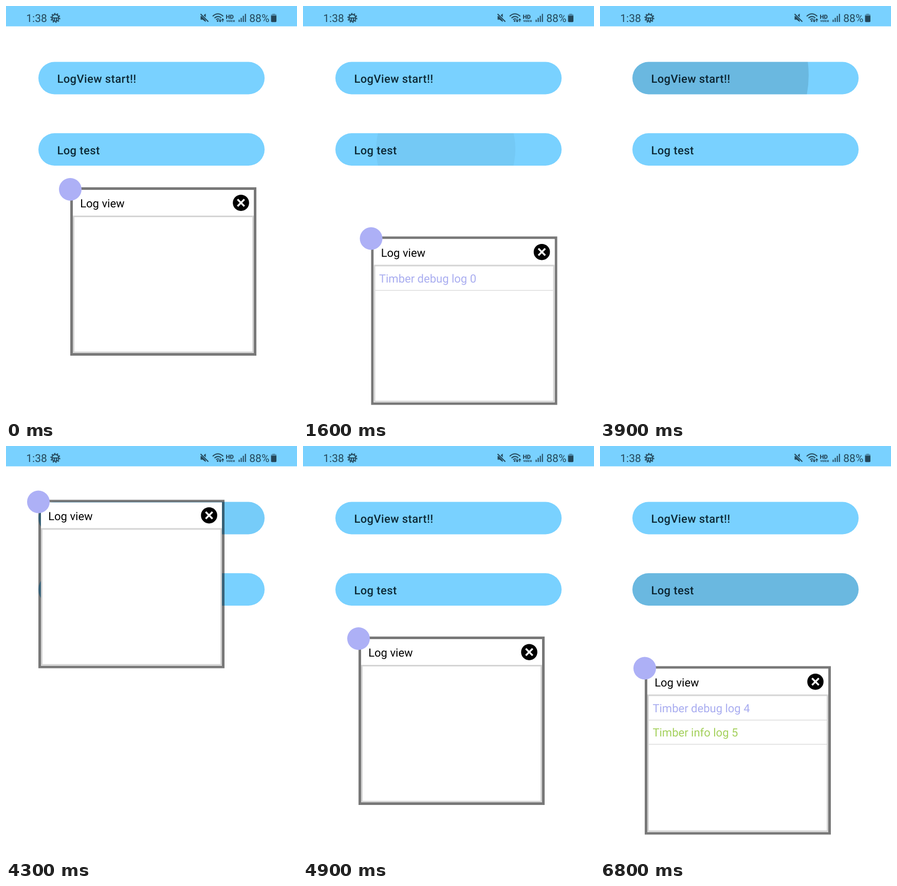
Write an HTML page that moves like this. It is 566 px wide and 800 px high and loops after 6.9 s.

```html
<!DOCTYPE html>
<html lang="en">
<head>
<meta charset="utf-8">
<title>Log view demo</title>
<style>
  html, body { margin: 0; width: 100%; height: 100%; overflow: hidden; background: #fff; }
  svg { display: block; width: 100vw; height: 100vh; }
  text { font-family: Roboto, sans-serif; font-size: 22px; text-rendering: geometricPrecision; }
  .status { fill: #24475a; }
  .status text { font-size: 21px; }
  .status .hd { font-size: 11.5px; font-weight: 800; }
  .status .voice { font-size: 7px; font-weight: 700; }
  .line { fill: none; stroke: #24475a; stroke-width: 2; }
  .label { font-weight: 500; letter-spacing: .38px; fill: #0e2a38; }
  .pill { fill: #79d1ff; }
</style>
</head>
<body>
<svg viewBox="0 0 566 800">
  <defs>
    <clipPath id="startClip"><rect x="63" y="108.5" width="440" height="63" rx="31.5"/></clipPath>
    <clipPath id="testClip"><rect x="63" y="247" width="440" height="63" rx="31.5"/></clipPath>
  </defs>

  <rect class="pill" width="566" height="39.5"/>
  <g class="status">
    <text x="39.3" y="31">1:38</text>
    <!-- settings -->
    <circle class="line" cx="96" cy="23.2" r="6.6"/>
    <circle class="line" cx="96" cy="23.2" r="8.6" stroke-dasharray="2.7 2.7"/>
    <path class="line" d="M89.5 23.2H102.5M94 23.2V29M98 23.2V29" stroke-width="1.8"/>
    <!-- muted speaker -->
    <path d="M378.5 19.5H382.5L388.5 14.8V31L382.5 26.6H378.5Z"/>
    <path d="M378.5 14.8L394 30.5" stroke="#79d1ff" stroke-width="4"/>
    <path class="line" d="M378.5 15.5L393.5 30.5"/>
    <!-- wifi -->
    <g class="line">
      <path d="M402 20Q412 10.5 422.5 20M405.5 23.5Q412 17.5 418.8 23"/>
      <path d="M408.6 26.6Q412 23.8 414.6 26"/>
      <path d="M416.5 24.5V30M414.3 28L416.5 30.5L418.7 28M421.5 31V25.5M419.3 27.6L421.5 25L423.7 27.6" stroke-width="1.5"/>
    </g>
    <circle cx="411.6" cy="29" r="1.7"/>
    <text class="hd" x="427.5" y="24.6">HD</text>
    <text class="voice" x="428.5" y="30.8">voice</text>
    <!-- signal -->
    <path d="M452.5 26.5h2v4.5h-2zM456.5 23h2v8h-2zM460.6 19h2v12h-2zM464.7 15.3h2v15.7h-2z"/>
    <text x="473.3" y="31">88%</text>
    <!-- battery -->
    <path d="M518 15H523.5V16.5H526V20H515.5V16.5H518Z" opacity=".5"/>
    <path d="M515.5 19H526V29.5Q526 31.3 524.2 31.3H517.3Q515.5 31.3 515.5 29.5Z"/>
  </g>

  <rect class="pill" x="63" y="108.5" width="440" height="63" rx="31.5"/>
  <text class="label" x="99.4" y="149">LogView start!!</text>
  <g id="start" clip-path="url(#startClip)"></g>

  <rect class="pill" x="63" y="247" width="440" height="63" rx="31.5"/>
  <text class="label" x="99.4" y="287.5">Log test</text>
  <g id="test" clip-path="url(#testClip)"></g>

  <g id="panel">
    <rect x="2.5" y="2.5" width="357" height="322" fill="none" stroke="#000" stroke-opacity=".53" stroke-width="5"/>
    <rect x="5" y="5" width="352" height="317" fill="#fff"/>
    <rect x="6.5" y="56.5" width="349" height="264" fill="none" stroke="#d4d4d4" stroke-width="3"/>
    <text x="19.2" y="39">Log view</text>
    <circle cx="332" cy="30.2" r="15.8"/>
    <path d="M325.4 23.6L338.6 36.8M338.6 23.6L325.4 36.8" stroke="#fff" stroke-width="3.5"/>
    <g id="rows"></g>
    <circle cx="0" cy="4" r="22" fill="#adb0f6"/>
  </g>
</svg>
<script>
const LOOP = 6900, STEP = 100;
const GROW = 360, FADE_IN = 120, FADE_OUT = 240, LOG_DELAY = 50;
const CLOSED = 3400;
const CENTER_X = 283, R0 = 132, R1 = 238;

const $ = id => document.getElementById(id);
const lerp = (a, b, k) => a + (b - a) * k;
const clamp = v => Math.max(0, Math.min(1, v));

function add(parent, tag, attrs, text = '') {
  const el = document.createElementNS('http://www.w3.org/2000/svg', tag);
  for (const name in attrs) el.setAttribute(name, attrs[name]);
  el.textContent = text;
  return parent.appendChild(el);
}

// cubic-bezier(.4, 0, .2, 1)
function ease(x) {
  let lo = 0, hi = 1;
  for (let i = 0; i < 20; i++) {
    const s = (lo + hi) / 2, q = 1 - s;
    if (1.2 * s * q * q + .6 * s * s * q + s ** 3 < x) lo = s; else hi = s;
  }
  return 3 * lo * lo * (1 - lo) + lo ** 3;
}

// Points are [time, x, y, opacity]
const track = [
  [0, 125, 352, 1], [100, 127, 375, 1], [200, 131, 425, 1], [300, 132.5, 447.5, 1],
  [3200, 132.5, 447.5, 1], [CLOSED, 132.5, 447.5, 0],
  [3900, 63, 104.5, 0], [4100, 63, 104.5, 1], [4500, 63, 104.5, 1],
  [4600, 66, 112, 1], [4700, 78, 136.5, 1], [4800, 115, 235, 1], [4900, 108, 370, 1],
  [5000, 87, 427.5, 1], [LOOP, 87, 427.5, 1]
];

function panelAt(t) {
  const i = track.findIndex(p => p[0] > t);
  const a = track[i - 1], b = track[i], k = (t - a[0]) / (b[0] - a[0]);
  return a.map((v, n) => lerp(v, b[n], k));
}

const levels = [['debug', '#a9adf0'], ['info', '#a4d05c'], ['error', '#ee5c55'], ['warn', '#d9863f']];
const testTaps = [880, 1560, 2149, 2440, 6060, 6450];

const ripples = testTaps.map(time => ({ time, x: 277, y: 278, midY: 278.5, box: $('test') }));
ripples.push({ time: 3745, x: 142, y: 130, midY: 140, box: $('start') });
ripples.forEach(r => r.el = add(r.box, 'circle', {}));

const rows = testTaps.map((time, n) => {
  const [name, fill] = levels[n % 4];
  const el = add($('rows'), 'g', { transform: `translate(0 ${n % 4 * 47})` });
  add(el, 'text', { x: 15.4, y: 89.5, fill }, `Timber ${name} log ${n}`);
  add(el, 'rect', { x: 8, y: 104, width: 346, height: 1.6, fill: '#dedede' });
  return { el, from: time + LOG_DELAY, to: time < CLOSED ? CLOSED : LOOP };
});

function drawRipple(r, t) {
  const age = t - r.time, k = clamp(age / GROW);
  const alpha = clamp(age / FADE_IN) * (1 - clamp((age - GROW) / FADE_OUT));
  r.el.setAttribute('cx', lerp(r.x, CENTER_X, k));
  r.el.setAttribute('cy', lerp(r.y, r.midY, k));
  r.el.setAttribute('r', lerp(R0, R1, ease(k)));
  r.el.setAttribute('opacity', .12 * alpha);
}

function draw(now) {
  const t = Math.floor(now % LOOP / STEP) * STEP;
  const [, x, y, opacity] = panelAt(t);
  $('panel').setAttribute('transform', `translate(${x} ${y})`);
  $('panel').setAttribute('opacity', opacity);
  ripples.forEach(r => drawRipple(r, t));
  for (const { el, from, to } of rows)
    el.setAttribute('visibility', t >= from && t < to ? 'visible' : 'hidden');
}

const origin = performance.now();
function tick() {
  draw(performance.now() - origin);
  requestAnimationFrame(tick);
}
tick();
</script>
</body>
</html>
```
